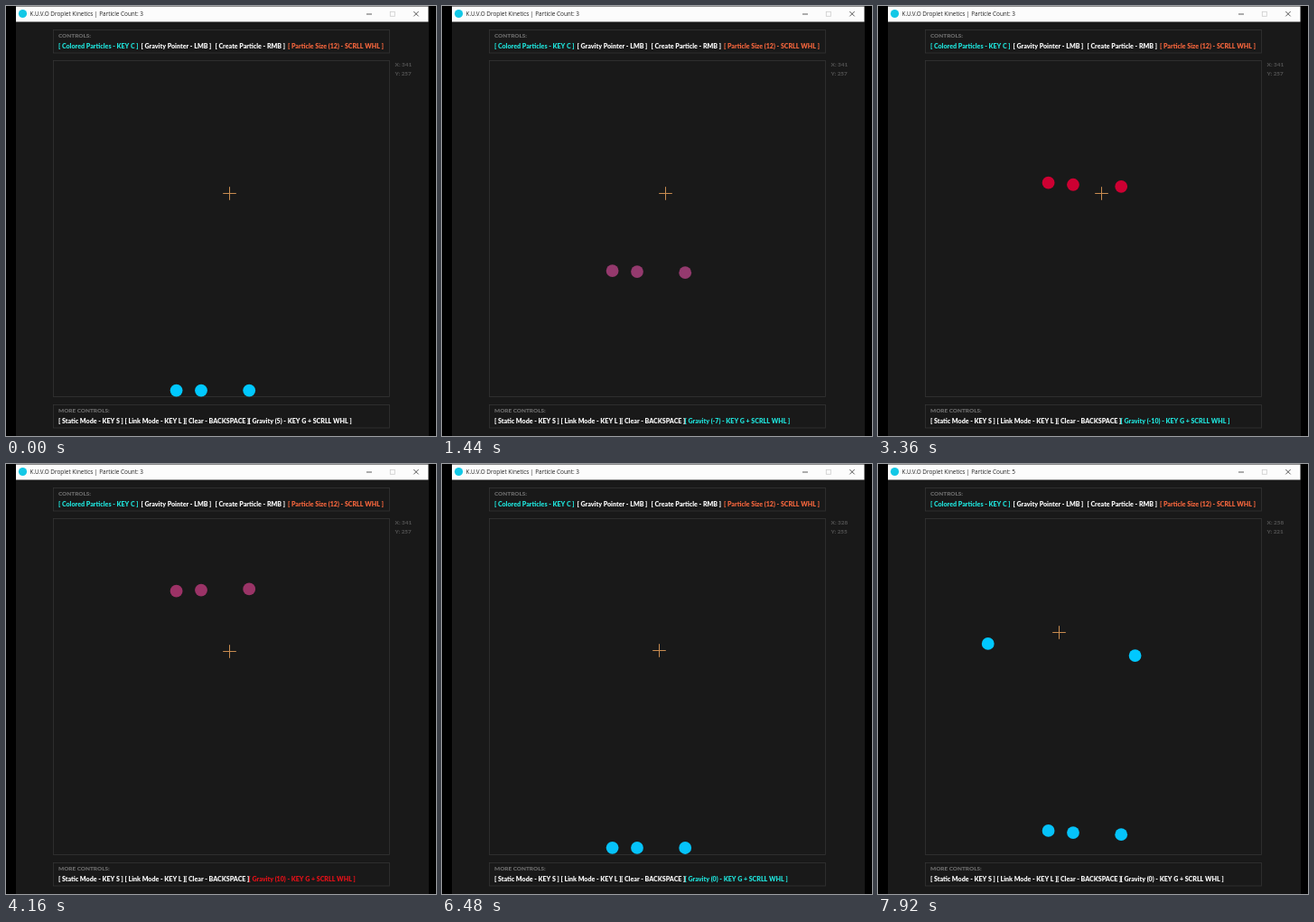
Animation, 476 px wide and 476 px high, one loop 8000 ms. Source, as an HTML page with a canvas:

```html
<!DOCTYPE html>
<html lang="en">
<head>
<meta charset="utf-8">
<title>Particles</title>
<style>
  html, body { margin: 0; width: 100%; height: 100%; overflow: hidden; background: #000; }
  canvas { display: block; width: 476px; height: 476px; }
</style>
</head>
<body>
<canvas id="stage"></canvas>
<script>
const SIZE = 476, LOOP = 8000, STEP = 80;
const ARENA = { x: 52.6, y: 60.6, scale: 1.75 };
const RADIUS = 6.9, FLOOR = 425.6, CEIL = 67.4;
const CYAN = '#1fe0d8', ORANGE = '#f0643c', WHITE = '#f8f8f8', RED = '#e01018';
const GREY = '#6a6a6a', DIM = '#4c4c4c';

const canvas = document.getElementById('stage');
const ctx = canvas.getContext('2d');
const dpr = window.devicePixelRatio || 1;
canvas.width = canvas.height = SIZE * dpr;
ctx.scale(dpr, dpr);

// The wheel turns gravity one unit per notch towards each target
const NOTCH = 30;
const scrolls = [
  { at: 360, to: -7 }, { at: 1480, to: -10 }, { at: 1700, to: 10 },
  { at: 2560, to: -10 }, { at: 3480, to: 10 }, { at: 6120, to: 0 }
];

// Crossings between floor and ceiling, each starting as gravity changes sign
const passes = [
  { at: 500, time: 1399, power: 2.5, from: FLOOR, to: CEIL },
  { at: 1990, time: 864, power: 2, from: CEIL, to: FLOOR },
  { at: 2860, time: 672, power: 1.5, from: FLOOR, to: CEIL },
  { at: 3780, time: 840, power: 2, from: CEIL, to: FLOOR }
];
const WEIGHTLESS = 6420, HOP = 240, PULL = 1000;

const balls = [188.6, 216, 269.2].map((x, i) => ({ x, lag: 3 * i, drift: 13.1 - 1.4 * i }));

const MOVE = 320;
const cursorStops = [
  { at: 0, x: 341, y: 257 },
  { at: 4960, x: 328, y: 255 },
  { at: 7160, x: 406, y: 265, click: true },
  { at: 7560, x: 121, y: 242, click: true },
  { at: 7920, x: 258, y: 221 }
];

const mix = (a, b, p) => a + (b - a) * p;
const clamp = (v, lo, hi) => Math.min(hi, Math.max(lo, v));
const smooth = p => p * p * (3 - 2 * p);
const toStage = p => ({ x: ARENA.x + p.x / ARENA.scale, y: ARENA.y + p.y / ARENA.scale });

function gravityAt(t) {
  return scrolls.reduce((g, s) => {
    const notches = Math.max(0, Math.floor((t - s.at) / NOTCH));
    return g + clamp(s.to - g, -notches, notches);
  }, 5);
}

function cursorAt(t) {
  return cursorStops.reduce((p, stop) => {
    const k = smooth(clamp((t - stop.at + MOVE) / MOVE, 0, 1));
    return { x: mix(p.x, stop.x, k), y: mix(p.y, stop.y, k) };
  });
}

function flight(ball, time) {
  if (time > WEIGHTLESS) {
    return { y: FLOOR - ball.drift * (time - WEIGHTLESS) / 1000, v: ball.drift };
  }
  const t = time - ball.lag;
  const pass = passes.filter(p => t >= p.at).pop();
  if (!pass) return { y: FLOOR, v: 0 };
  const { at, power, from, to } = pass;
  const s = (t - at) / pass.time, span = to - from;
  if (s < 1) {
    return { y: from + span * s ** power, v: span * power * s ** (power - 1) / pass.time * 1000 };
  }
  // small rebound after landing
  const u = Math.min(t - at - pass.time, HOP) / 1000, left = HOP / 1000 - u;
  return { y: to - Math.sign(span) * PULL / 2 * u * left, v: PULL * (left - u) / 2 * (left > 0) };
}

function speedColor(v) {
  const slow = [0, 200, 255], mid = [148, 58, 110], fast = [205, 0, 50];
  const s = Math.abs(v);
  const blend = (a, b, p) => a.map((n, i) => Math.round(mix(n, b[i], Math.min(1, p))));
  return `rgb(${s < 350 ? blend(slow, mid, s / 320) : blend(mid, fast, (s - 350) / 270)})`;
}

function rect(x, y, w, h, color) {
  ctx.fillStyle = color;
  ctx.fillRect(x, y, w, h);
}

function frame(x, y, w, h, color = '#343434') {
  ctx.strokeStyle = color;
  ctx.lineWidth = 0.8;
  ctx.strokeRect(x, y, w, h);
}

function line(color, width, ...segments) {
  ctx.strokeStyle = color;
  ctx.lineWidth = width;
  ctx.beginPath();
  for (const [x0, y0, x1, y1] of segments) {
    ctx.moveTo(x0, y0);
    ctx.lineTo(x1, y1);
  }
  ctx.stroke();
}

function disc(x, y, r, color) {
  ctx.fillStyle = color;
  ctx.beginPath();
  ctx.arc(x, y, r, 0, Math.PI * 2);
  ctx.fill();
}

function write(text, x, y, color, font) {
  ctx.font = font;
  ctx.fillStyle = color;
  ctx.fillText(text, x, y);
}

const label = (text, x, y, color) => write(text, x, y, color, '900 6.4px Lato, sans-serif');
const item = (text, x, y, color = WHITE) =>
  write(`[ ${text} ]`, x, y, color, '900 7.1px Lato, sans-serif');

function drawWindow(count) {
  rect(0, 0, SIZE, SIZE, '#000');
  rect(11, 0, 457, SIZE, '#191919');
  rect(11, 0.5, 456.5, 17, '#fcfcfc');
  disc(18.5, 8.5, 4.6, '#12c8e6');
  write(`K.U.V.O Droplet Kinetics | Particle Count: ${count}`, 26.5, 11.2, '#222',
    '6.4px "Open Sans", "Noto Sans", sans-serif');
  line('#333', 0.8, [399, 9, 405, 9], [451.3, 6, 456.7, 11.4], [456.7, 6, 451.3, 11.4]);
  frame(425.3, 6.3, 5, 5, '#ccc');
}

function drawControls(t) {
  frame(52.5, 26.5, 372, 25.5);
  label('CONTROLS:', 58, 35.4, GREY);
  item('Colored Particles - KEY C', 58, 46.8, CYAN);
  item('Gravity Pointer - LMB', 149.5, 46.8);
  item('Create Particle - RMB', 231.5, 46.8);
  item('Particle Size (12) - SCRLL WHL', 312, 46.8, ORANGE);

  const g = gravityAt(t);
  const held = (t >= 160 && t < 4640) || (t >= 5440 && t < 6720);
  frame(52.5, 441.5, 372, 25.5);
  label('MORE CONTROLS:', 58, 450.4, GREY);
  item('Static Mode - KEY S', 58, 461.8);
  item('Link Mode - KEY L', 131.5, 461.8);
  item('Clear - BACKSPACE', 198, 461.8);
  item(`Gravity (${g}) - KEY G + SCRLL WHL`, 268.5, 461.8, !held ? WHITE : g > 0 ? RED : CYAN);
}

function drawCursor(t) {
  const p = cursorAt(t), at = toStage(p);
  const x = Math.floor(at.x) + 0.5, y = Math.floor(at.y) + 0.5;
  line('#c98c50', 1, [x - 7.3, y, x + 7.3, y], [x, y - 7.3, x, y + 7.3]);
  label(`X: ${Math.round(p.x)}`, 430.5, 67.4, DIM);
  label(`Y: ${Math.round(p.y)}`, 430.5, 76.5, DIM);
}

function draw(t) {
  const spawned = cursorStops.filter(s => s.click && t >= s.at).map(toStage);
  drawWindow(balls.length + spawned.length);
  drawControls(t);
  frame(52.5, 60.5, 372, 372);
  for (const ball of balls) {
    const { y, v } = flight(ball, t);
    disc(ball.x, y, RADIUS, speedColor(v));
  }
  for (const p of spawned) disc(p.x, p.y, RADIUS, speedColor(0));
  drawCursor(t);
}

const start = performance.now();
function tick() {
  const t = (performance.now() - start) % LOOP;
  draw(Math.floor(t / STEP) * STEP);
  requestAnimationFrame(tick);
}
tick();
</script>
</body>
</html>
```
